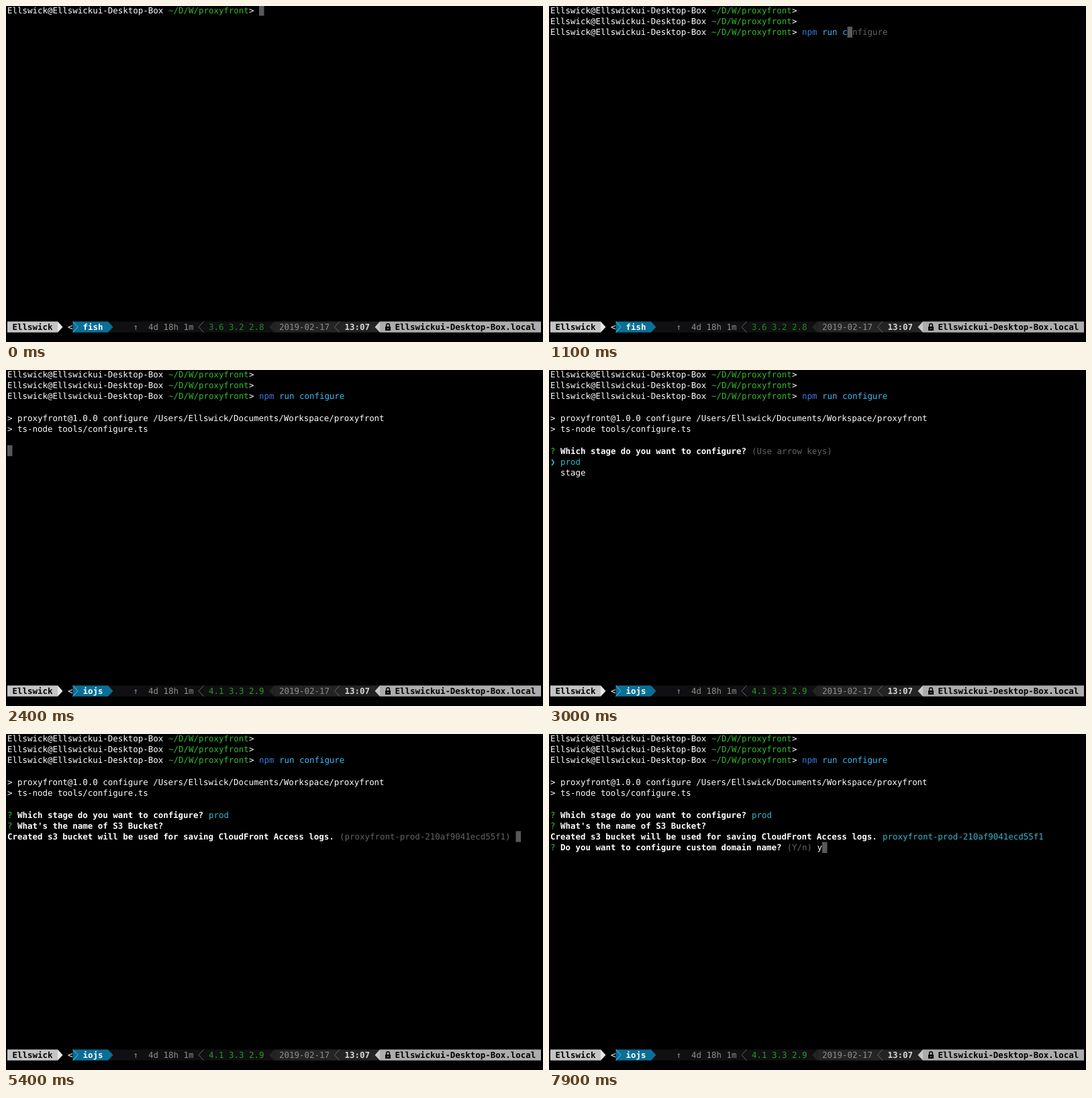
These frames come from a looping animation (800 px wide and 500 px high, 8000 ms). An HTML page with a canvas:

```html
<!DOCTYPE html>
<html lang="en">
<head>
<meta charset="utf-8">
<title>Terminal session</title>
<style>
  html, body { margin: 0; width: 100%; height: 100%; overflow: hidden; background: #000; }
  canvas { display: block; }
</style>
</head>
<body>
<canvas id="stage" width="800" height="500"></canvas>
<script>
const ctx = document.getElementById('stage').getContext('2d');

const LOOP = 8000;
const LEFT = 2, CELL = 7.5, LINE = 16.25, TOP = -1.75, BASE = 10.8;
const FACE = '12.457px "DejaVu Sans Mono", monospace';
const STATUS = 29;

const USER = 'Ellswick';
const HOST = 'Ellswickui-Desktop-Box';
const COMMAND = 'npm run configure';
const BUCKET = 'proxyfront-prod-210af9041ecd55f1';

const C = {
  text: '#fff', bold: '#fff', dim: '#646464', cursor: '#585858',
  green: '#33bb2a', cyan: '#33b8c8', command: '#3a7ae0', param: '#38bcf8',
  session: '#c4c4c4', sessionTip: '#e8e8e8', host: '#acacac', hostTip: '#c8c8c8',
  blue: '#0a6f96', edge: '#62bfe2',
  bar: '#101012', barDate: '#242424', barText: '#8e8e8e', thin: '#686868'
};

// Moments at which the session changes
const T = {
  enter1: 100, enter2: 300, type: 400, rest: 600, run: 1900,
  output: 2300, ask: 2800, down: 4000, up: 4400, stage: 4600,
  bucket: 6000, yes: 7500
};

const colX = col => LEFT + col * CELL;
const rowY = row => TOP + row * LINE;

function write(row, col, text, color = C.text, bold = false) {
  ctx.font = (bold ? 'bold ' : '') + FACE;
  ctx.fillStyle = color;
  ctx.fillText(text, colX(col), BASE + row * LINE);
  return col + text.length;
}

// Writes [text, color, bold] runs one after another
function line(row, ...runs) {
  return runs.reduce((col, run) => write(row, col, ...run), 0);
}

function block(row, col, count, color) {
  ctx.fillStyle = color;
  ctx.fillRect(colX(col), rowY(row), count * CELL, LINE);
}

const cursor = (row, col) => block(row, col, 1, C.cursor);

// Powerline arrow filling one cell; dir is 1 for right, -1 for left
function arrow(col, dir, fill, stroke) {
  const x = colX(col), y = rowY(STATUS);
  const back = dir > 0 ? x : x + CELL;
  ctx.beginPath();
  ctx.moveTo(back, y);
  ctx.lineTo(back + dir * CELL, y + LINE / 2);
  ctx.lineTo(back, y + LINE);
  if (fill) {
    ctx.fillStyle = fill;
    ctx.fill();
  }
  if (stroke) {
    ctx.strokeStyle = stroke;
    ctx.lineWidth = 1;
    ctx.stroke();
  }
}

function lock(x, y) {
  ctx.fillStyle = ctx.strokeStyle = '#000';
  ctx.fillRect(x, y + 5, 8, 6);
  ctx.lineWidth = 1.5;
  ctx.beginPath();
  ctx.moveTo(x + 1.7, y + 5);
  ctx.lineTo(x + 1.7, y + 3);
  ctx.arc(x + 4, y + 3, 2.3, Math.PI, 0);
  ctx.lineTo(x + 6.3, y + 5);
  ctx.stroke();
  ctx.fillStyle = C.host;
  ctx.fillRect(x + 3.4, y + 7, 1.2, 2);
}

function statusBar(t) {
  const running = t >= T.output;
  const put = (col, text, color, bold) => write(STATUS, col, text, color, bold);

  block(STATUS, 0, 10, C.session);
  put(1, USER, '#000', true);
  arrow(10, 1, C.sessionTip);

  block(STATUS, 20, 33, C.bar);
  block(STATUS, 13, 7, C.blue);
  put(12, '<', C.text);
  arrow(13, 1, null, C.edge);
  put(15, running ? 'iojs' : 'fish', C.bold, true);
  arrow(20, 1, C.blue);

  put(25, '↑', C.barText);
  put(28, '4d 18h 1m', C.barText);
  arrow(38, -1, null, C.thin);
  put(40, running ? '4.1 3.3 2.9' : '3.6 3.2 2.8', running ? '#249c20' : '#1a8c1a');

  arrow(52, -1, C.barDate);
  block(STATUS, 53, 21, C.barDate);
  put(54, '2019-02-17', C.barText);
  arrow(65, -1, null, C.thin);
  put(67, '13:07', '#d8d8d8', true);

  arrow(73, -1, C.hostTip);
  block(STATUS, 74, 32, C.host);
  lock(565, 472);
  put(77, HOST + '.local', '#000', true);
}

const prompt = row => line(row,
  [USER + '@' + HOST + ' '], ['~/D/W/proxyfront', C.green], ['> ']);

function typedCount(t) {
  if (t < T.type) return 0;
  const step = Math.floor((t - T.type) / 100);
  if (t < T.rest + 100) return step + 1;
  return Math.min(COMMAND.length, 3 + Math.floor((step - 2) * 14 / 11));
}

function shell(t) {
  const last = t < T.enter1 ? 0 : t < T.enter2 ? 1 : 2;
  let col = 0;
  for (let row = 0; row <= last; row++) col = prompt(row);

  const count = typedCount(t);
  if (t < T.run) cursor(last, col + count);
  if (!count) return;
  const typed = COMMAND.slice(0, count);
  write(2, col, typed.slice(0, 3), C.command);
  write(2, col + 3, typed.slice(3), C.param);
  write(2, col + count, COMMAND.slice(count), C.dim);
}

function question(row, text, ...rest) {
  return line(row, ['? ', C.green], [text + ' ', C.bold, true], ...rest);
}

function stageMenu(t) {
  const hint = t < T.down ? [['(Use arrow keys)', C.dim]] : [];
  question(7, 'Which stage do you want to configure?', ...hint);
  const picked = t >= T.down && t < T.up ? 1 : 0;
  ['prod', 'stage'].forEach((name, i) => {
    const on = i === picked;
    line(8 + i, [on ? '❯ ' : '  ', C.cyan], [name, on ? C.cyan : C.text]);
  });
}

function answers(t) {
  question(7, 'Which stage do you want to configure?', ['prod', C.cyan]);
  question(8, "What's the name of S3 Bucket?");
  const done = t >= T.bucket;
  const end = line(9,
    ['Created s3 bucket will be used for saving CloudFront Access logs. ', C.bold, true],
    done ? [BUCKET, C.cyan] : ['(' + BUCKET + ') ', C.dim]);
  if (!done) return cursor(9, end);
  const reply = t >= T.yes ? 'y' : '';
  cursor(10, question(10, 'Do you want to configure custom domain name?',
    ['(Y/n) ', C.dim], [reply]));
}

function output(t) {
  if (t < T.output) return cursor(3, 0);
  line(4, ['> proxyfront@1.0.0 configure /Users/' + USER + '/Documents/Workspace/proxyfront']);
  line(5, ['> ts-node tools/configure.ts']);
  if (t < T.ask) cursor(7, 0);
  else if (t < T.stage) stageMenu(t);
  else answers(t);
}

function draw(now) {
  const t = now % LOOP;
  ctx.fillStyle = '#000';
  ctx.fillRect(0, 0, 800, 500);
  shell(t);
  if (t >= T.run) output(t);
  statusBar(t);
  requestAnimationFrame(draw);
}

ctx.textBaseline = 'alphabetic';
ctx.textRendering = 'geometricPrecision';
ctx.fontKerning = 'none';
draw(performance.now());
</script>
</body>
</html>
```
